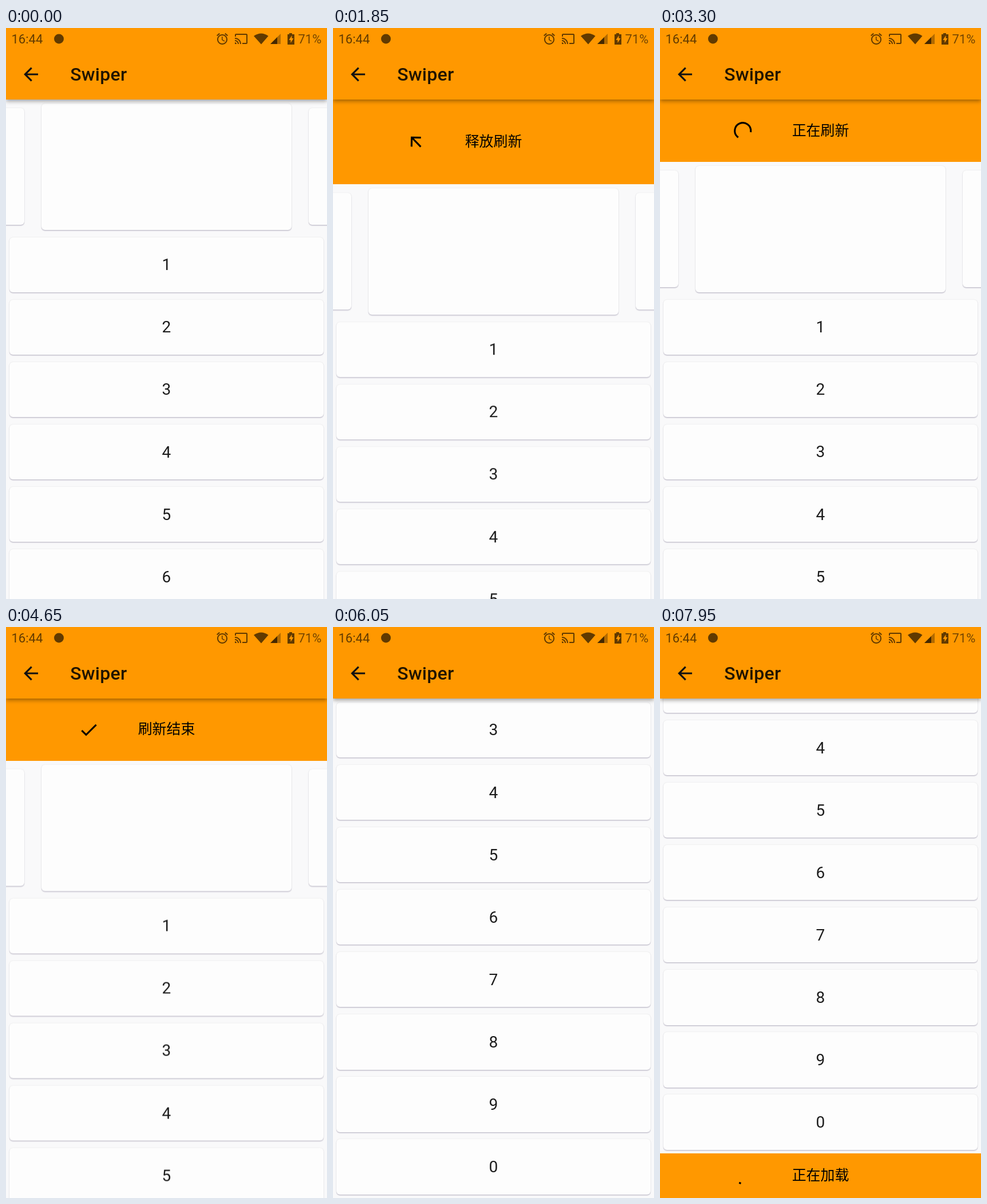
An HTML page that plays this animation: 561 by 998 pixels, repeating every 8000 ms.

```html
<!DOCTYPE html>
<html lang="zh">
<head>
<meta charset="utf-8">
<title>Swiper</title>
<style>
  html, body { margin: 0; width: 100%; height: 100%; overflow: hidden; }
  body { position: relative; background: #f9f9fa; font-family: Roboto, "Noto Sans CJK SC", "Noto Sans CJK", sans-serif; color: #1c1c1c; }
  #stage { position: absolute; left: 0; top: 0; width: 561px; height: 998px; overflow: hidden; }
  #list { position: absolute; left: 0; top: 125px; width: 561px; will-change: transform; }
  .card {
    position: absolute; display: flex; align-items: center; justify-content: center;
    background: #fdfdfd; border-radius: 6px; font-size: 28px;
    box-shadow: 0 1.5px 1.5px rgba(40, 30, 80, .24), 0 0 2px rgba(0, 0, 0, .12);
  }
  .panel { position: absolute; left: 0; width: 561px; overflow: hidden; background: #ff9800; color: #000; }
  #header { top: 125px; }
  #footer { bottom: 0; }
  .panel span { position: absolute; left: 0; width: 100%; top: 50%; line-height: 36px; margin-top: -18px; text-align: center; font-size: 24.9px; }
  .panel svg { position: absolute; left: 126.3px; top: 50%; margin-top: -18.7px; width: 37.4px; height: 37.4px; overflow: visible; }
  #bar { position: absolute; left: 0; top: 0; width: 561px; height: 125px; background: #ff9800; box-shadow: 0 3px 7px rgba(0, 0, 0, .36); }
  #bar svg { position: absolute; left: 0; top: 0; }
</style>
</head>
<body>
<div id="stage">
  <div id="list"></div>
  <div class="panel" id="header"></div>
  <div class="panel" id="footer"></div>
  <div id="bar">
    <svg width="561" height="125">
      <g fill="#000" fill-opacity=".62">
        <text x="9.5" y="27" font-size="22">16:44</text>
        <circle cx="92.5" cy="19" r="8.5"/>
        <path transform="translate(366 7)" d="M22 5.72l-4.6-3.86-1.29 1.53 4.6 3.86L22 5.72zM7.88 3.39L6.6 1.86 2 5.71l1.29 1.53 4.59-3.85zM12.5 8H11v6l4.75 2.85.75-1.23-4-2.37V8zM12 4c-4.97 0-9 4.03-9 9s4.02 9 9 9c4.97 0 9-4.03 9-9s-4.03-9-9-9zm0 16c-3.87 0-7-3.13-7-7s3.13-7 7-7 7 3.13 7 7-3.13 7-7 7z"/>
        <path transform="translate(399 7)" d="M21 3H3c-1.1 0-2 .9-2 2v3h2V5h18v14h-7v2h7c1.1 0 2-.9 2-2V5c0-1.1-.9-2-2-2zM1 18v3h3c0-1.66-1.34-3-3-3zm0-4v2c2.76 0 5 2.24 5 5h2c0-3.87-3.13-7-7-7zm0-4v2c4.97 0 9 4.03 9 9h2c0-6.08-4.93-11-11-11z"/>
        <path d="M433 14Q446 5 458.5 14L446 28.5z"/>
        <path fill-opacity=".3" d="M480 10V28H462z"/>
        <path d="M474 16V28H462z"/>
        <path fill-rule="evenodd" d="M495 11V9h5v2h4v18h-12V11zM499.500 13l-5 8h3v5l5-8h-3z"/>
        <text x="510.500" y="27" font-size="22" fill-opacity=".55">71%</text>
      </g>
      <path fill="#111" transform="translate(24.900 62.300) scale(1.558)" d="M20 11H7.830l5.590-5.590L12 4l-8 8 8 8 1.410-1.410L7.830 13H20v-2z"/>
      <text x="112.200" y="91.500" font-size="32" font-weight="500" letter-spacing=".25" fill="#221500">Swiper</text>
    </svg>
  </div>
</div>
<script>
const $ = id => document.getElementById(id);
const LOOP = 8000, ROW = 109.08, END = -452, HEADER = 109, FOOTER = 78;

function addCard(x, y, w, h, label = '') {
  const card = document.createElement('div');
  card.className = 'card';
  card.textContent = label;
  card.style.cssText = `left:${x}px;top:${y}px;width:${w}px;height:${h}px`;
  $('list').append(card);
}
addCard(-400, 15, 432, 204);
addCard(62.3, 7, 436.4, 221);
addCard(528.5, 15, 432, 204);
for (let i = 0; i < 10; i++) addCard(6.2, 240.6 + i * ROW, 548.6, 96.4, (i + 1) % 10);

const linear = p => p;
const outQuad = p => 1 - (1 - p) ** 2;
const outCubic = p => 1 - (1 - p) ** 3;
const smooth = p => p * p * (3 - 2 * p);
const clamp = p => Math.max(0, Math.min(1, p));

// Keys are [time, value, easing towards this key].
function track(t, keys) {
  let [t0, v0] = keys[0];
  for (const [t1, v1, ease = linear] of keys) {
    if (t < t1) return t <= t0 ? v0 : v0 + (v1 - v0) * ease((t - t0) / (t1 - t0));
    [t0, v0] = [t1, v1];
  }
  return v0;
}

const scrollKeys = [
  [1450, 0], [1700, HEADER], [1850, 148], [2280, 178, outQuad], [2650, HEADER, outCubic],
  [4650, HEADER], [5100, 0, outQuad], [5600, 0], [6050, END, smooth],
  [6450, END], [6700, END - 100], [6840, END - 145, outQuad], [6900, END - 139.5],
  [7150, END - FOOTER, outCubic]
];
const footerKeys = [
  [6450, 0], [6700, 95], [6820, 116, outQuad], [6900, 100], [7050, FOOTER, outCubic]
];

// Approximates the fast-out-slow-in curve, cubic-bezier(.4, 0, .2, 1).
function fastOutSlowIn(x) {
  let lo = 0, hi = 1;
  for (let i = 0; i < 16; i++) {
    const s = (lo + hi) / 2;
    const bx = 1.2 * s * (1 - s) ** 2 + .6 * s * s * (1 - s) + s ** 3;
    if (bx < x) lo = s; else hi = s;
  }
  return lo * lo * (3 - 2 * lo);
}

function makePanel(id, times, labels, turn) {
  const el = $(id);
  el.innerHTML = `<svg viewBox="0 0 24 24">
    <path d="M4 12l1.410 1.410L11 7.830V20h2V7.830l5.580 5.590L20 12l-8-8-8 8z"/>
    <path fill="none" stroke="#000" stroke-width="2" stroke-linecap="square"/>
    <path d="M9 16.200L4.800 12l-1.400 1.400L9 19 21 7l-1.400-1.400L9 16.200z"/>
  </svg><span></span>`;
  const [arrow, ring, check] = el.querySelectorAll('path');
  const text = el.querySelector('span');
  const [armed, busy, done] = times;

  return (t, height) => {
    el.style.height = height + 'px';
    const state = times.filter(time => t >= time).length;
    text.textContent = labels[state];
    arrow.style.display = state < 2 ? '' : 'none';
    ring.style.display = state === 2 ? '' : 'none';
    check.style.display = state === 3 ? '' : 'none';
    const [from, to] = turn;
    arrow.setAttribute('transform', `rotate(${from + (to - from) * clamp((t - armed) / 200)} 12 12)`);
    if (state === 2) ring.setAttribute('d', ringPath((t - busy) / 1000));
  };
}

function ringPath(time) {
  const step = Math.floor(time), p = time - step;
  const head = fastOutSlowIn(clamp(p * 2)), tail = fastOutSlowIn(clamp(p * 2 - 1));
  const start = Math.PI * (-.5 + 1.5 * tail + 1.7 * p - .8 * step);
  const sweep = Math.max(1.5 * Math.PI * (head - tail), .01);
  const point = a => `${12 + 9 * Math.cos(a)} ${12 + 9 * Math.sin(a)}`;
  return `M${point(start)}A9 9 0 ${sweep > Math.PI ? 1 : 0} 1 ${point(start + sweep)}`;
}

const drawHeader = makePanel('header', [1700, 2700, 3750],
  ['下拉刷新', '释放刷新', '正在刷新', '刷新结束'], [-180, 0]);
const drawFooter = makePanel('footer', [6650, 7000, LOOP],
  ['上拉加载', '释放加载', '正在加载', '加载结束'], [0, 180]);

function draw(now) {
  const t = now % LOOP;
  const y = track(t, scrollKeys);
  $('list').style.transform = `translateY(${y}px)`;
  drawHeader(t, Math.max(0, y));
  drawFooter(t, track(t, footerKeys));
  requestAnimationFrame(draw);
}
draw(performance.now());
</script>
</body>
</html>
```
